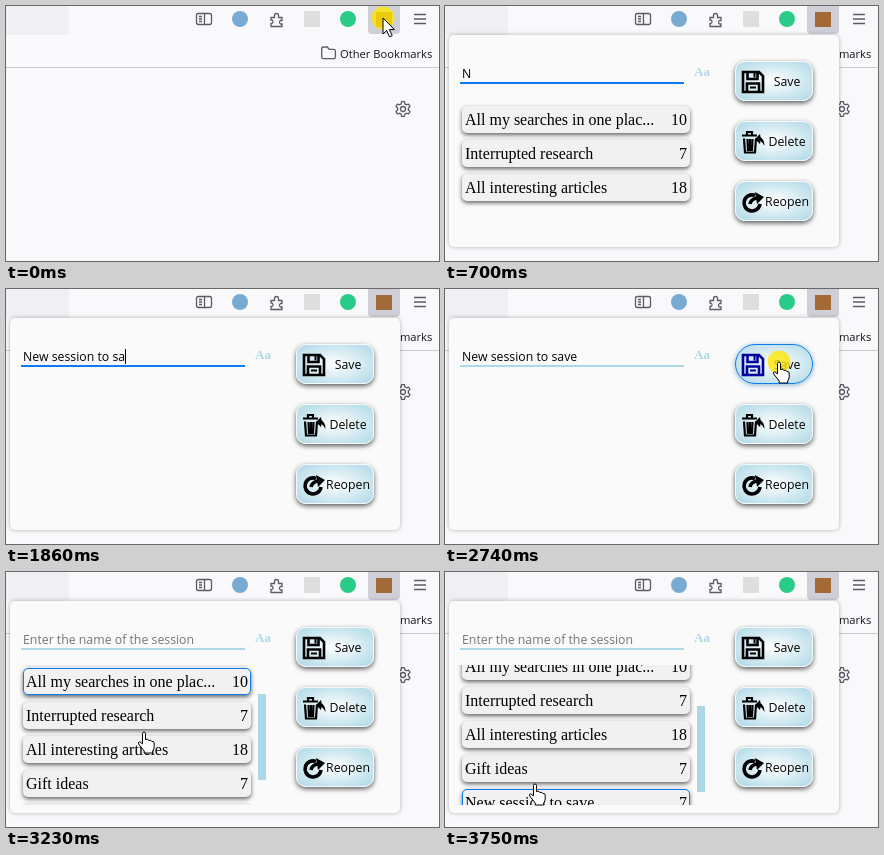
These frames come from a looping animation (433 by 255 pixels, 3800 ms). An HTML page:

```html
<!DOCTYPE html>
<html lang="en">
<head>
<meta charset="utf-8">
<title>Saving a session</title>
<style>
  html, body { margin: 0; width: 100%; height: 100%; overflow: hidden; background: #f9f9fb; }
  body, #popup, svg.layer { position: absolute; left: 0; top: 0; width: 433px; height: 255px; }
  body { font: 12.3px "Open Sans", "Noto Sans", sans-serif; color: #000; }
  #popup * { position: absolute; box-sizing: border-box; }
  #panel { left: 4px; top: 29px; width: 390px; height: 212px; border-radius: 5px;
    background: #fafafa; box-shadow: 0 0 4px rgba(0, 0, 0, .3); }
  #field { left: 15px; top: 58px; width: 224px; height: 20px; border-bottom: 2px solid #add8e6; }
  #field.focus { border-color: #0a7cee; }
  #field span { left: 2px; top: 0; line-height: 19px; white-space: pre; }
  #hint { color: #757575; }
  #caret { top: 2px; width: 1px; height: 15px; background: #000; }
  #case { left: 249px; top: 57px; font: bold 13px/18px "Liberation Serif", serif; color: #add8e6; }
  #list { left: 10px; top: 93px; width: 240px; height: 140px; overflow: hidden;
    font: 16px/27px "Liberation Serif", serif; }
  .row { left: 7px; width: 228px; height: 27px; border-radius: 5px; background: #f1f1f1;
    box-shadow: 0 2px 4px rgba(0, 0, 0, .6); }
  .row span { left: 3px; top: 0; white-space: pre; }
  .row b { right: 3px; top: 0; font-weight: normal; }
  .row.hover::after { content: ""; position: absolute; inset: 0; border: 1px solid #0a7cee; border-radius: 5px; }
  #thumb { left: 252px; width: 8px; background: #add8e6; }
  .button { left: 290px; width: 78px; height: 40px; border: 1px solid #f2fafc; border-radius: 10px;
    background: radial-gradient(#fff, #add8e6); box-shadow: 0 2px 5px rgba(0, 0, 0, .65); }
  .button span { left: 25px; width: 52px; top: 0; line-height: 39px; text-align: center; }
  .button svg { left: 5px; top: 8px; width: 24px; height: 24px; color: #000; }
  .button.hover { border-color: #0a7cee; border-radius: 20px; box-shadow: 0 1px 5px rgba(60, 130, 180, .6); }
  .button.hover svg { color: #00009c; }
</style>
</head>
<body>
<svg class="layer" fill="none" stroke="#5b5b66" stroke-width="1.3">
  <g stroke="none">
    <rect x="-8" width="71" height="29" rx="3" y="0" fill="#f0f0f4"/>
    <rect y="61" width="433" height="1" fill="#cccccf"/>
    <rect x="362" y="-5" width="32" height="33" rx="4" fill="#cfcfd8"/>
    <circle cx="234" cy="13" r="8" fill="#79abd2"/>
    <rect x="298" y="5" width="16" height="16" fill="#dedede"/>
    <circle cx="342" cy="13" r="8" fill="#2acb87"/>
    <rect x="370" y="6" width="16" height="15" fill="#a36a38"/>
    <text x="334" y="52" font-size="11.2" fill="#15141a">Other Bookmarks</text>
  </g>
  <rect x="190.500" y="7.500" width="15" height="11" rx="2"/>
  <path d="M198.500 8v10M193 10.500h3M193 13h3M193 15.500h3"/>
  <path d="M265 11.500h3.500v-2a2 2 0 0 1 4 0v2h3.500v3h-1.500a2 2 0 0 0 0 3.500h1.500v2.500h-11v-3h1a2 2 0 0 0 0-3.500h-1z"/>
  <path d="M408 8.500h12M408 13h12M408 17.500h12"/>
  <path d="M315.700 51v-8.500q0-1.500 1.500-1.500h4l2 2.300h4.500q1.700 0 1.700 1.700v6q0 1.700-1.700 1.700h-10.300q-1.700 0-1.700-1.700z"/>
  <circle cx="397" cy="103" r="2.500"/>
  <path id="gear"/>
</svg>

<div id="popup">
  <div id="panel"></div>
  <div id="field"><span id="hint">Enter the name of the session</span><span id="typed"></span><i id="caret"></i></div>
  <div id="case">Aa</div>
  <div id="list"></div>
  <div id="thumb"></div>
  <div class="button" id="save" style="top:55px">
    <svg viewBox="0 0 24 24" fill="none" stroke="currentColor" stroke-width="2.600">
      <path d="M2 2h16l4 4v16H2zM6.500 2v7h10v-7M6 22v-8.500h12v8.500"/><path d="M13.500 3v4.500M9 17.500h6" stroke-width="2"/>
    </svg><span>Save</span></div>
  <div class="button" style="top:115px">
    <svg viewBox="0 0 24 24" fill="none" stroke="currentColor" stroke-width="2.200">
      <path d="M1 5.500h15M6 5V2h5v3M3 8.500l1 14h10l1-14M6.500 9l.5 12M9 9v12M11.500 9l-.5 12"/>
      <path d="M14 9l5-5 .5 3q4 3 4 9-2-4-4-5l-.5 3z" fill="currentColor" stroke="none"/>
    </svg><span>Delete</span></div>
  <div class="button" style="top:175px">
    <svg viewBox="0 0 24 24" fill="none" stroke="currentColor" stroke-width="3.600">
      <path d="M19 14a8 8 0 1 1-5-8.500M9 14q1-5 7-6"/><path d="M14 2l9 5-7 7z" fill="currentColor" stroke="none"/>
    </svg><span>Reopen</span></div>
</div>

<svg class="layer">
  <g id="pointer" fill="#fff" stroke="#000" stroke-linejoin="round">
    <circle id="click" r="11.500" fill="#ffe600" fill-opacity=".78" stroke="none"/>
    <path id="arrow" d="M0 0v16l3.700-3.500 2.800 6.300 2.700-1.200-2.800-6h5z"/>
    <path id="beam" d="M-3.500-8h2.500l1 1 1-1h2.500M-3.500 8h2.500l1-1 1 1h2.500M0-7V7" fill="none" stroke-width="1.300"/>
    <path id="hand" d="M-1.500 1.500q0-1.500 1.500-1.500t1.500 1.500v6q3-1 3.300 1 2.600-.8 3 1 2.400-.4 2.400 1.500v4q0 2-1.500 4v2h-8.500v-2l-5.500-7q-.8-2 1-2.200l2.800 2z"/>
  </g>
</svg>

<script>
const LOOP = 3800, SAVED = 2830, PITCH = 34, ROW = 27, LIST_TOP = 93, FIRST_ROW = 100;
const $ = id => document.getElementById(id);
const show = (el, on) => { el.style.display = on ? "" : "none"; };
const between = (v, lo, hi) => v >= lo && v < hi;

const sessions = [["My usual tabs", 8], ["All my searches in one plac...", 10],
  ["Interrupted research", 7], ["All interesting articles", 18], ["Gift ideas", 7],
  ["New session to save", 7]];
const phrase = "New session to save";
const keyTimes = [700, 780, 860, 960, 1040, 1140, 1220, 1300, 1350, 1410, 1460, 1530,
  1590, 1660, 1740, 1820, 1860, 1940, 2060];
const cursorPath = [[0, 377, 12], [50, 377, 12], [350, 193, 65], [450, 177, 66], [2460, 177, 66],
  [2690, 334, 73], [2990, 334, 73], [3150, 138, 160], [3340, 138, 160], [3490, 90, 212]];
const scrollPath = [[3150, 0], [3230, 38], [3340, 71], [3540, 71], [3750, 53]];

const rows = sessions.map(([name, count]) => {
  const row = document.createElement("div");
  row.className = "row";
  row.innerHTML = `<span>${name}</span><b>${count}</b>`;
  return $("list").appendChild(row);
});

$("gear").setAttribute("d", "M" + Array.from({ length: 72 }, (_, i) => {
  const a = i * Math.PI / 36;
  const r = 6.4 + Math.max(-1, Math.min(1, 2.2 * Math.cos(6 * a + Math.PI)));
  return `${(397 + r * Math.cos(a)).toFixed(2)} ${(103 + r * Math.sin(a)).toFixed(2)}`;
}).join("L") + "z");

// Linear interpolation along [time, ...values] keys, held at both ends.
function along(keys, t) {
  const next = keys.findIndex(k => k[0] > t);
  if (next < 0) return keys[keys.length - 1].slice(1);
  if (next === 0) return keys[0].slice(1);
  const a = keys[next - 1], b = keys[next], p = (t - a[0]) / (b[0] - a[0]);
  return a.slice(1).map((v, i) => v + (b[i + 1] - v) * p);
}

function drawField(t) {
  const text = t < SAVED ? phrase.slice(0, keyTimes.filter(k => k <= t).length) : "";
  $("typed").textContent = text;
  show($("hint"), !text);
  $("field").classList.toggle("focus", t < 2700);
  show($("caret"), between(t, 1820, 2310));
  $("caret").style.left = 2 + Math.round($("typed").offsetWidth) + "px";
  return text.toLowerCase();
}

function drawList(t, query, x, y) {
  const [scroll] = along(scrollPath, t);
  // The hovered row is only updated when the pointer moves, not while scrolling.
  const hoverY = y - FIRST_ROW + (t < 3340 ? 0 : 71);
  const hovered = t > SAVED && between(x, 17, 245) && hoverY >= 0 && hoverY % PITCH < ROW
    ? Math.floor(hoverY / PITCH) : -1;
  let count = 0;
  rows.forEach((row, i) => {
    const on = (i < 5 || t >= SAVED) && sessions[i][0].toLowerCase().includes(query);
    show(row, on);
    row.classList.toggle("hover", i === hovered);
    if (on) row.style.top = FIRST_ROW - LIST_TOP + PITCH * count++ - scroll + "px";
  });
  show($("thumb"), count > 4);
  $("thumb").style.top = LIST_TOP + .77 * scroll + "px";
  $("thumb").style.height = (count > 5 ? 86 : 105) + "px";
  return hovered >= 0;
}

function drawPointer(t, x, y, overLink) {
  const overField = t >= 50 && between(x, 15, 239) && between(y, 55, 78);
  $("pointer").setAttribute("transform", `translate(${x} ${y})`);
  show($("pointer"), !between(t, 700, 2460));
  show($("click"), t < 50 || between(t, 2700, SAVED));
  show($("beam"), overField);
  show($("hand"), overLink);
  show($("arrow"), !overField && !overLink);
}

function draw(t) {
  const [x, y] = along(cursorPath, t);
  $("popup").style.opacity = Math.max(0, Math.min(1, (t - 40) / 100));
  show($("popup"), t >= 50);
  const overSave = t > 2460 && between(x, 290, 368) && between(y, 55, 95);
  $("save").classList.toggle("hover", overSave);
  const overRow = drawList(t, drawField(t), x, y);
  const scrolling = between(t, 3150, 3340) || t > 3490;
  drawPointer(t, x, y, overSave || overRow || scrolling);
}

const start = performance.now();
function tick() {
  draw((performance.now() - start) % LOOP);
  requestAnimationFrame(tick);
}
tick();
</script>
</body>
</html>
```
